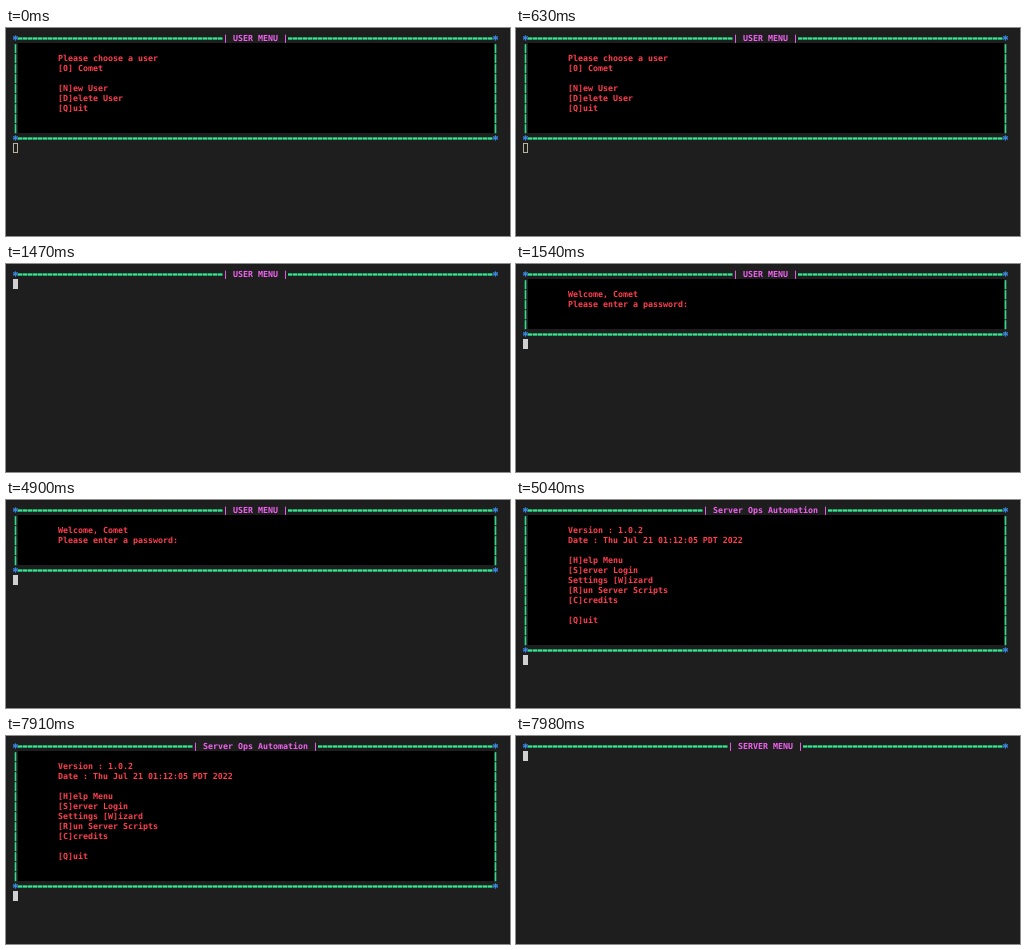
These frames come from a looping animation (504x208 px, 8000 ms). An HTML page:

```html
<!DOCTYPE html>
<html lang="en">
<head>
<meta charset="utf-8">
<title>Terminal menu</title>
<style>
html, body { margin: 0; width: 100%; height: 100%; overflow: hidden; background: #1e1e1e; }
/* Its own layer gives greyscale, unhinted text */
#term { position: relative; width: 504px; height: 208px; overflow: hidden; will-change: transform;
  font: bold 8.3px/10px "DejaVu Sans Mono", monospace; text-rendering: geometricPrecision; }
#term * { position: absolute; white-space: pre; box-sizing: border-box; }
.panel { left: 12px; top: 15px; width: 476px; background: #000; }
.bar { color: #35dc8c; -webkit-text-stroke: .7px; }
.rule { height: 3px; margin-top: 4px; background:
  repeating-linear-gradient(90deg, transparent 0 4px, #1e1e1e80 4px 5px),
  linear-gradient(#28a067 1px, #38e692 1px 2px, #28a067 2px); }
.star { color: #3b8eea; font-size: 10px; margin: 2.5px 0 0 -.5px; -webkit-text-stroke: .4px; }
.title { color: #f062f0; }
.text { color: #ff3e4e; }
.cursor { width: 5px; height: 10px; background: #d0d0d0; }
.hollow { background: none; border: 1px solid #b8b49c; }
</style>
</head>
<body>
<div id="term"></div>
<script>
const term = document.getElementById("term");
const COLS = 97, LOOP = 8000;

const put = (col, row, cls, text = "", style = "") =>
  `<span class="${cls}" style="left:${7 + col * 5}px;top:${5 + row * 10}px;${style}">${text}</span>`;

const ends = (row, cls, text) => put(0, row, cls, text) + put(COLS - 1, row, cls, text);

const rule = (col, row, length) => put(col, row, "rule", "", `width:${length * 5}px`);

function header(name) {
  const title = `| ${name} |`, side = (COLS - 2 - title.length) / 2;
  return ends(0, "star", "*") + rule(1, 0, side) + put(1 + side, 0, "title", title) +
    rule(1 + side + title.length, 0, side);
}

const headerOnly = name => header(name) + put(0, 1, "cursor");

function menu(name, rows, lines, cursor = "cursor") {
  let html = `<div class="panel" style="height:${rows * 10}px"></div>` + header(name);
  for (let r = 1; r <= rows; r++) html += ends(r, "bar", "|");
  lines.forEach((text, i) => html += put(9, i + 2, "text", text));
  return html + ends(rows + 1, "star", "*") + rule(1, rows + 1, COLS - 2) +
    put(0, rows + 2, cursor);
}

const USER = "USER MENU", OPS = "Server Ops Automation";
const choose = ["Please choose a user", "[0] Comet", "",
  "[N]ew User", "[D]elete User", "[Q]uit"];
const welcome = ["Welcome, Comet", "Please enter a password:"];
const main = ["Version : 1.0.2", "Date : Thu Jul 21 01:12:05 PDT 2022", "",
  "[H]elp Menu", "[S]erver Login", "Settings [W]izard",
  "[R]un Server Scripts", "[C]credits", "", "[Q]uit"];

// Start time in ms and screen content
const screens = [
  [0, menu(USER, 9, choose, "cursor hollow")],
  [700, menu(USER, 9, choose)],
  [1470, headerOnly(USER)],
  [1540, menu(USER, 5, welcome)],
  [4970, headerOnly(OPS)],
  [5040, menu(OPS, 13, main)],
  [7980, headerOnly("SERVER MENU")]
];

let shown;
function draw() {
  const t = performance.now() % LOOP;
  const screen = screens.findLast(([start]) => t >= start);
  if (screen !== shown) {
    shown = screen;
    term.innerHTML = screen[1];
  }
  requestAnimationFrame(draw);
}
draw();
</script>
</body>
</html>
```
